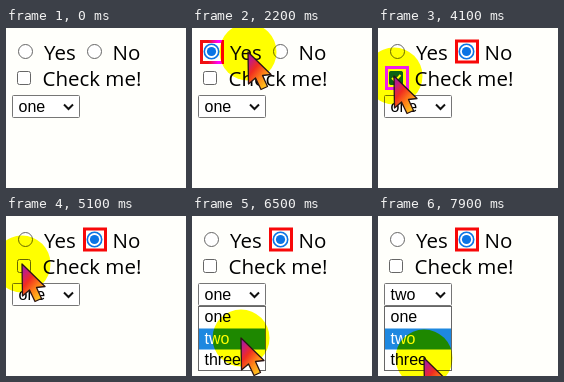
Write an HTML page that moves like this. It is 180 by 160 pixels and loops after 8 s.

```html
<!DOCTYPE html>
<html lang="en">
<head>
<meta charset="utf-8">
<title>Form controls</title>
<style>
  html, body { margin: 0; width: 100%; height: 100%; overflow: hidden; background: #fffffb; }
  svg { display: block; width: 100%; height: 100%; isolation: isolate; }
  .label { font: 20.5px "Open Sans", "Noto Sans", sans-serif; }
  .field { font: 16px "Liberation Sans", Arial, sans-serif; }
  .box { fill: #fff; stroke: #666; }
  .mark { fill: none; stroke-width: 3; }
  .blue { fill: #0b74e5; }
  .lit { fill: #0a0a9c; }
  #halo { fill: #ff0; mix-blend-mode: multiply; }
</style>
</head>
<body>
<svg viewBox="0 0 180 160">
  <defs>
    <linearGradient id="flame" x1="0" y1="0" x2=".75" y2="1">
      <stop offset="0" stop-color="#8a20b0"/>
      <stop offset=".2" stop-color="#c41c80"/>
      <stop offset=".42" stop-color="#f02c20"/>
      <stop offset=".7" stop-color="#ff8418"/>
      <stop offset="1" stop-color="#ffd020"/>
    </linearGradient>
    <linearGradient id="blend">
      <stop offset=".3" stop-color="#f01010"/>
      <stop offset=".8" stop-color="#f0f"/>
    </linearGradient>
    <g id="radioOn">
      <circle r="7.2" fill="#fff" stroke="#0b74e5" stroke-width="1.6"/>
      <circle r="4.6" class="blue"/>
    </g>
  </defs>
  <rect width="180" height="160" fill="#fffffb"/>

  <circle class="box" cx="19.5" cy="23.5" r="7"/>
  <circle class="box" cx="88.5" cy="23.5" r="7"/>
  <rect class="box" x="11.5" y="43.5" width="13" height="13" rx="2"/>
  <text id="yesLabel" class="label" x="38" y="32">Yes</text>
  <text class="label" x="106.5" y="32">No</text>
  <text class="label" x="36.5" y="58">Check me!</text>

  <g id="yes">
    <rect class="mark" x="9.5" y="13.5" width="21" height="21" stroke="url(#blend)"/>
    <use href="#radioOn" x="19.5" y="23.5"/>
  </g>
  <g id="no">
    <rect class="mark" x="78.5" y="13" width="21" height="21" stroke="#f80808"/>
    <use href="#radioOn" x="88.5" y="23.5"/>
  </g>
  <rect id="select" x="6.5" y="67.5" width="67" height="22" fill="#fff"/>
  <text id="value" class="field" x="12.5" y="84"></text>
  <path id="chevron" d="M58 76.5l4.5 4.5 4.5-4.5" fill="none" stroke-width="2"/>

  <g id="list">
    <rect class="box" x="6.5" y="90.5" width="67" height="64"/>
    <rect id="active" x="7" width="66" height="21" fill="#1e88e0"/>
    <g id="options"></g>
  </g>

  <circle id="halo" r="28.5"/>
  <g id="check">
    <rect class="mark" x="8.5" y="39.5" width="21" height="21" stroke="#f01ce8"/>
    <rect x="11" y="43" width="14" height="14" rx="2" fill="#0b6212"/>
    <path d="M14 50l3 3 5.5-6" fill="none" stroke="#ff0" stroke-width="2"/>
  </g>
  <circle id="click" fill="none" stroke="#ee1010" stroke-width="3"/>
  <path id="arrow" d="M0 0L.5 32 7.5 26 13 37.5 19.5 34.5 14.5 23.5 23 22.5Z"
        fill="url(#flame)" stroke="#2a1414" stroke-width="1.3" stroke-linejoin="round"/>
</svg>
<script>
  const LOOP = 8000, STEP = 100;
  const $ = id => document.getElementById(id);
  const set = (id, attrs) => {
    for (const key in attrs) $(id).setAttribute(key, attrs[key]);
  };
  const show = (id, on) => set(id, { visibility: on ? "visible" : "hidden" });

  // time, x, y of the pointer tip
  const path = [
    [1100, 78, 96], [1700, 20, 25], [2000, 20, 25], [2200, 56, 24],
    [2450, 90, 24], [2900, 90, 24], [3300, 38, 44], [3600, 16, 48],
    [5300, 16, 48], [5500, 20, 55], [5900, 30, 79], [6100, 30, 79],
    [6500, 49, 122], [6800, 49, 122], [7200, 40, 83], [7400, 40, 83],
    [7900, 46, 142], [8000, 46, 142]
  ];
  const clicks = [1700, 2600, 3700, 4600, 5800, 6700, 7300];
  const names = ["one", "two", "three"];

  const options = names.map((name, i) => {
    const text = document.createElementNS("http://www.w3.org/2000/svg", "text");
    text.setAttribute("class", "field");
    text.setAttribute("x", 12.5);
    text.setAttribute("y", 106 + i * 21.5);
    text.textContent = name;
    return $("options").appendChild(text);
  });

  function tipAt(t) {
    const i = Math.max(1, path.findIndex(p => p[0] > t));
    const [t0, x0, y0] = path[i - 1], [t1, x1, y1] = path[i];
    const k = Math.max(0, (t - t0) / (t1 - t0));
    return [x0 + (x1 - x0) * k, y0 + (y1 - y0) * k];
  }

  function draw(t) {
    const between = (a, b) => t >= a && t < b;
    const [x, y] = tipAt(t);
    const transform = `translate(${x} ${y})`;
    for (const id of ["halo", "arrow", "click"]) set(id, { transform });
    show("halo", t >= 1100);
    show("arrow", t >= 1100);

    const pressed = clicks.find(c => between(c, c + 300));
    show("click", pressed !== undefined);
    if (pressed !== undefined) set("click", { r: 3.5 + (t - pressed) * 0.025 });

    const yes = between(1800, 2700);
    show("yes", yes);
    show("no", t >= 2700);
    show("check", between(3800, 4700));
    $("yesLabel").classList.toggle("lit", yes);

    const focused = between(6800, 7400);
    set("select", {
      stroke: focused ? "#101028" : "#767676",
      "stroke-width": focused ? 2 : 1,
      rx: focused ? 3 : 1
    });
    $("value").textContent = names[t < 6800 ? 0 : 1];
    $("value").classList.toggle("lit", focused);
    set("chevron", { stroke: focused ? "#0a0a9c" : "#111" });

    const active = t < 6400 ? 0 : 1;
    show("list", between(6000, 6800) || t >= 7400);
    set("active", { y: 91 + active * 21.5 });
    options.forEach((o, i) => { o.style.fill = i === active ? "#fff" : ""; });
  }

  function tick() {
    draw(Math.floor(performance.now() % LOOP / STEP) * STEP);
    requestAnimationFrame(tick);
  }
  tick();
</script>
</body>
</html>
```
